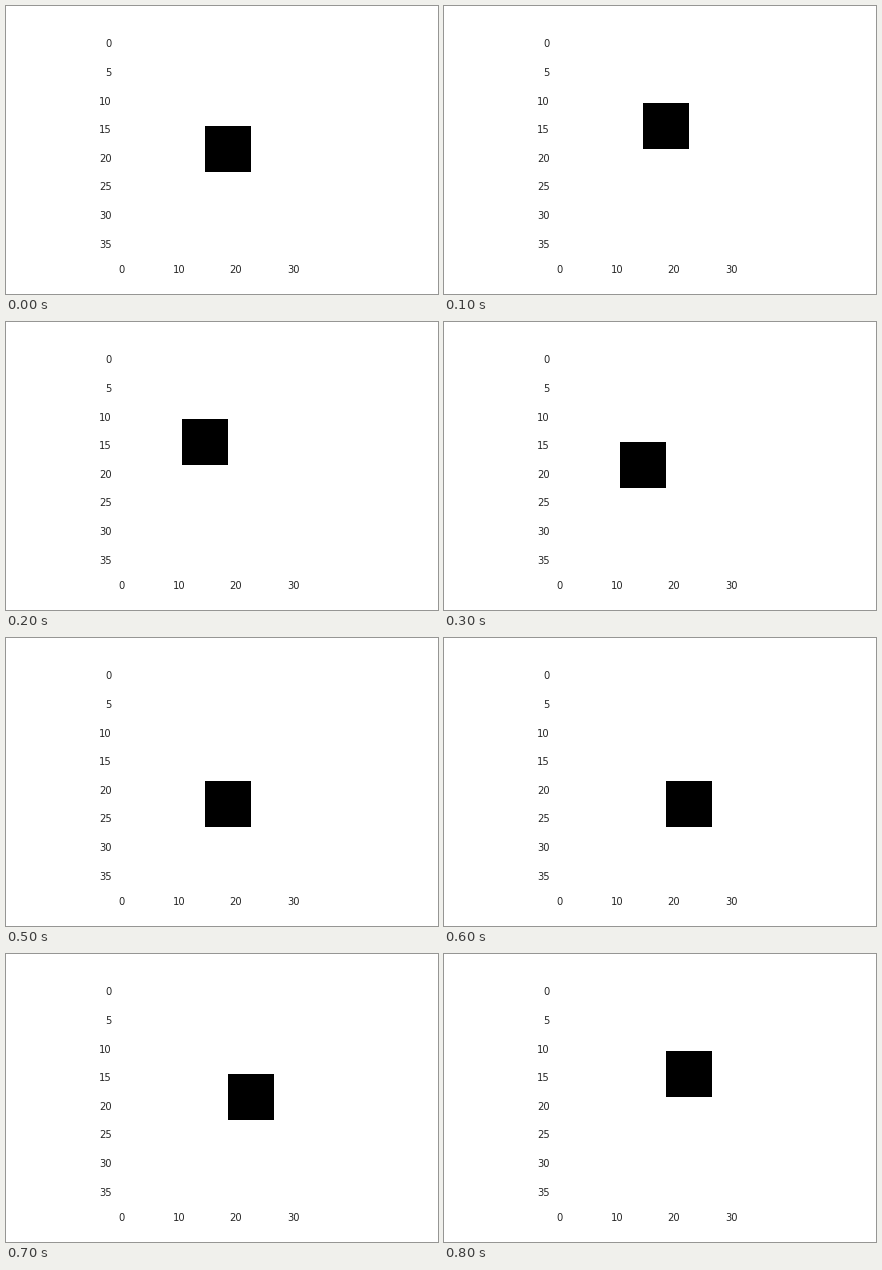
Recreate the animation shown at these times as a matplotlib script. Size 432 by 288 pixels, loop 0.9 s.

```python
import matplotlib.pyplot as plt
from matplotlib.animation import FuncAnimation
from matplotlib.patches import Rectangle
from matplotlib.transforms import IdentityTransform

W, H, DPI = 432, 288, 72
CELLS = 38                      # side of the square grid shown
LEFT, TOP, SIDE = 112.68, 34.56, 217.44
STEP = 23                       # pixels per move, four grid cells
BOX = 2 * STEP
CENTRE_X, CENTRE_Y = 199, 120   # top left corner of the box at rest

# Rest in the middle, then walk once around the ring of neighbours.
MOVES = [(0, 0), (0, -1), (-1, -1), (-1, 0), (-1, 1),
         (0, 1), (1, 1), (1, 0), (1, -1)]

plt.rcParams["font.family"] = "DejaVu Sans"

fig = plt.figure(figsize=(W / DPI, H / DPI), dpi=DPI, facecolor="white")
ax = fig.add_axes([LEFT / W, 1 - (TOP + SIDE) / H, SIDE / W, SIDE / H])
ax.set_xlim(-0.5, CELLS - 0.5)
ax.set_ylim(CELLS - 0.5, -0.5)
ax.set_xticks(range(0, CELLS, 10))
ax.set_yticks(range(0, CELLS, 5))
ax.tick_params(length=0, pad=7, labelsize=10, labelcolor="0.15")
for spine in ax.spines.values():
    spine.set_visible(False)

box = Rectangle((0, 0), BOX, BOX, facecolor="black", linewidth=0,
                antialiased=False, transform=IdentityTransform())
fig.add_artist(box)
box.set_transform(IdentityTransform())


def update(i):
    dx, dy = MOVES[i]
    box.set_xy((CENTRE_X + dx * STEP, H - CENTRE_Y - dy * STEP - BOX))
    return [box]


anim = FuncAnimation(fig, update, frames=len(MOVES), interval=100,
                     init_func=lambda: update(0), repeat=True, repeat_delay=0)
plt.show()
```
